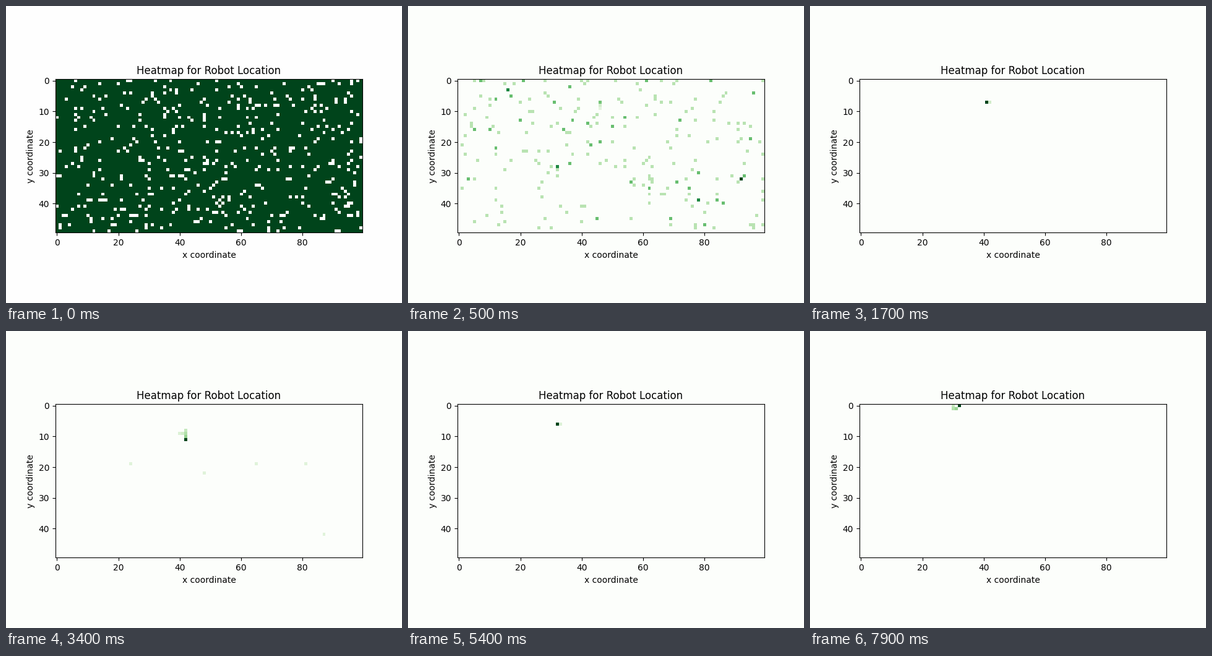
Write a matplotlib script that moves like this. It is 640 by 480 pixels and loops after 8 s.

```python
import numpy as np
import matplotlib.pyplot as plt
from matplotlib.animation import FuncAnimation

W, H, FRAMES = 100, 50, 80
TINT = "#fcfefb"
rng = np.random.default_rng(7)
walls = rng.random((H, W)) < 0.085

# Robot way-points: step, x, y; it stands still between equal places
WAY = np.array([
    (0, 45, 8), (2, 46, 9), (5, 46, 7), (14, 41, 7), (17, 41, 7),
    (29, 40, 9), (31, 42, 8), (34, 42, 11), (50, 32, 6), (54, 32, 6),
    (76, 30, 0), (77, 30, 1), (79, 32, 0),
])


def robot(step):
    pos = [np.interp(step, WAY[:, 0], WAY[:, i]) for i in (1, 2)]
    return np.floor(np.array(pos) + 0.5).astype(int)


class Search:
    """Possible places all over the map, thinned out by each reading."""

    def __init__(self, start, keep, count=2000):
        self.start, self.keep, self.count = start, keep, count
        cells = rng.permutation(W * H)[:count]
        self.y, self.x = np.divmod(cells, W)
        self.weight = np.minimum(rng.geometric(0.82, count), 4)

    def belief(self, step):
        k = step - self.start
        n = int(self.count * self.keep ** (k - 1))
        dx, dy = robot(step) - robot(self.start)
        x = np.clip(self.x[:n] + dx, 0, W - 1)
        y = np.clip(self.y[:n] + dy, 0, H - 1)
        total = np.zeros((H, W))
        np.add.at(total, (y, x), self.weight[:n])
        total[walls] = 0

        # Rivals pale as the robot's own place becomes certain
        sure = min(k / 10, 1)
        shade = np.where(total > 0, 0.06 + 0.235 * np.minimum(total, 4), 0)
        if k > 5:
            shade *= 1.5 - sure
        for age in range(min(5, k - 1), 0, -1):
            x, y = robot(step - age)
            shade[y, x] = max(shade[y, x], 0.5 * sure * 0.8 ** age)
        x, y = robot(step)
        shade[y, x] = sure
        return shade


searches = [Search(0, 0.585), Search(23, 0.55), Search(54, 0.38)]


def belief_at(step):
    if step == 0:
        return np.where(walls, 0.0, 1.0)
    return [s for s in searches if s.start < step][-1].belief(step)


plt.rcParams["font.family"] = "DejaVu Sans"
fig, ax = plt.subplots(figsize=(6.4, 4.8), dpi=100)
img = ax.imshow(np.zeros((H, W)), cmap="Greens", vmin=0, vmax=1,
                interpolation="nearest")
ax.set_title("Heatmap for Robot Location")
ax.set_xlabel("x coordinate")
ax.set_ylabel("y coordinate")


def update(step):
    img.set_data(np.ma.masked_equal(belief_at(step), 0))
    back = TINT if step else "#fefefe"
    fig.set_facecolor(back)
    ax.set_facecolor(back)
    return [img]


anim = FuncAnimation(fig, update, frames=FRAMES, interval=100, repeat=True,
                     repeat_delay=0, blit=False)
plt.show()
```
